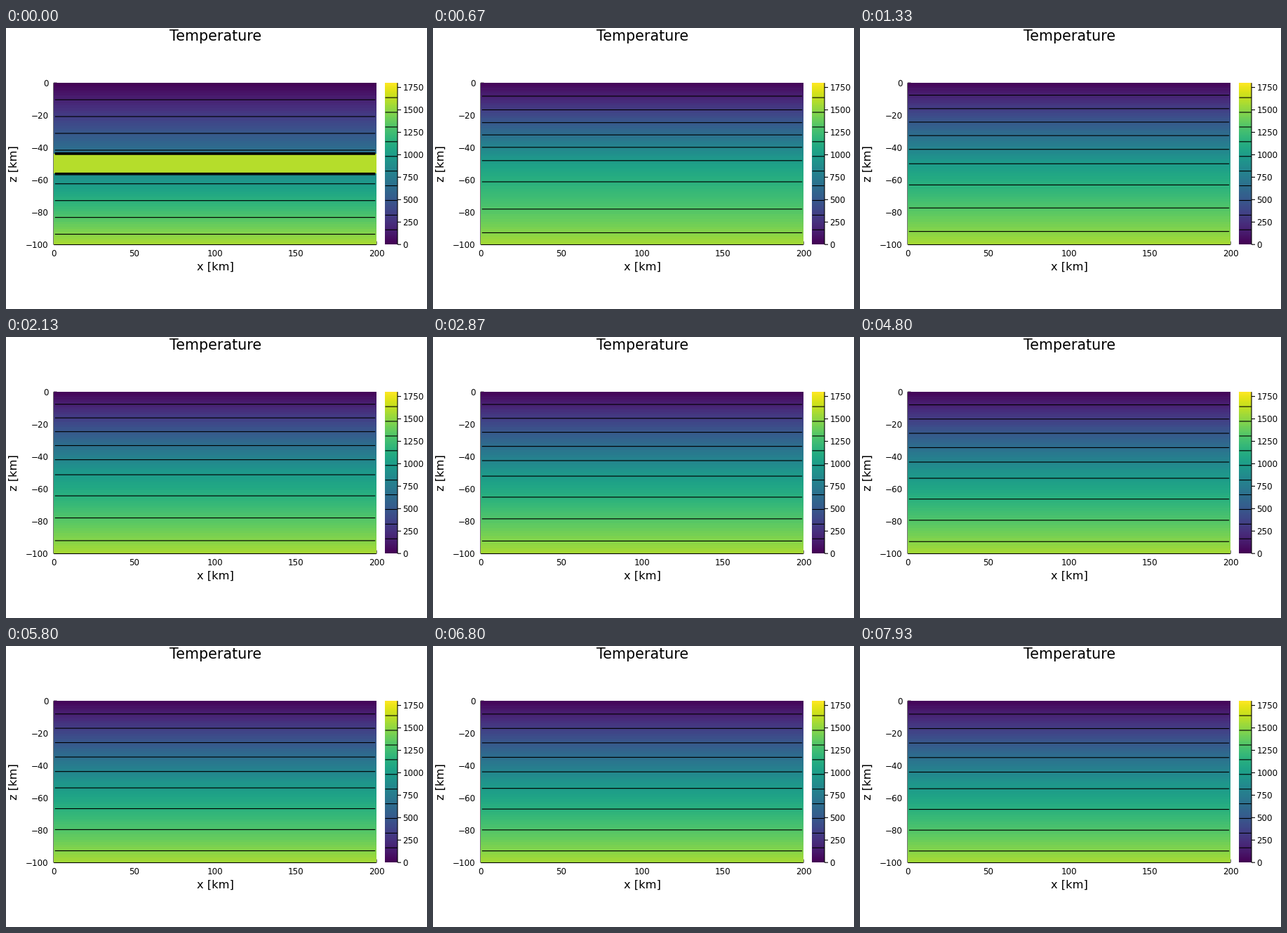
A matplotlib script for the animation above (8 s loop, 600 by 400 pixels).

```python
import numpy as np
import matplotlib.pyplot as plt
from matplotlib.animation import FuncAnimation
from matplotlib.collections import LineCollection

W, H, DPI = 600, 400, 100
FRAMES, LOOP_MS = 120, 8000
LEFT, RIGHT, TOP, BOTTOM = 68, 528, 78.2, 308.2
BAR_L, BAR_R = 540, 558
T_MAX, T_BASE, T_SILL = 1800, 1573, 1600
LEVELS = T_MAX / 11 * np.arange(1, 11)

# 1D heat equation on cell centres, fixed temperatures one cell outside
N = 64
DEPTH = (np.arange(N) + 0.5) * 100 / N
DECAY = 0.0222      # slowest mode, per frame
HEATING = 2.62      # gradient kept up by the heat source at 50 km

start = T_BASE * DEPTH / 100
start[np.abs(DEPTH - 50) < 6.25] = T_SILL

node = np.arange(1, N + 1)
steady = T_BASE * node / (N + 1)
steady += HEATING * (50 + 50 / N - np.abs(DEPTH - 50))

modes = np.sqrt(2 / (N + 1)) * np.sin(np.pi * np.outer(node, node) / (N + 1))
half = np.pi / (2 * (N + 1))
rates = DECAY * (np.sin(node * half) / np.sin(half)) ** 2
weights = modes @ (start - steady)


def temperature(frame):
    return steady + modes @ (weights * np.exp(-rates * frame))


def to_y(depth):
    return TOP + (BOTTOM - TOP) * depth / 100


def bar_y(value):
    return to_y(100 - 100 * value / T_MAX)


def contour_rows(temp):
    rows = []
    for level in LEVELS:
        d = temp - level
        for i in np.flatnonzero(d[:-1] * d[1:] < 0):
            part = d[i] / (d[i] - d[i + 1])
            rows.append(to_y(DEPTH[i] + part * (DEPTH[i + 1] - DEPTH[i])))
    return rows


def px(size):
    return size * 72 / DPI


def label(x, y, text, size, ha="center", **kw):
    ax.text(x, y, text, fontsize=px(size), ha=ha, va="baseline",
            rotation_mode="anchor", **kw)


def line(xs, ys, width=1.1, zorder=3):
    ax.plot(xs, ys, color="black", lw=px(width), zorder=zorder,
            solid_capstyle="butt", snap=False)


plt.rcParams["font.family"] = "DejaVu Sans"
fig = plt.figure(figsize=(W / DPI, H / DPI), dpi=DPI, facecolor="white")
ax = fig.add_axes([0, 0, 1, 1])
ax.axis("off")

style = dict(cmap="viridis", vmin=0, vmax=T_MAX, aspect="auto",
             interpolation="nearest", zorder=1)
field = ax.imshow(start[:, None], extent=(LEFT, RIGHT, BOTTOM, TOP), **style)
ax.imshow(np.linspace(T_MAX, 0, 256)[:, None],
          extent=(BAR_L, BAR_R, BOTTOM, TOP), **style)
ax.set_xlim(0, W)
ax.set_ylim(H, 0)

contours = LineCollection([], colors="black", linewidths=px(1.15),
                          zorder=2, snap=False)
ax.add_collection(contours)

# axes; the frame and its inward ticks lie half under the field
line([LEFT, RIGHT], [BOTTOM + 0.3, BOTTOM + 0.3])
line([LEFT, LEFT], [TOP, BOTTOM], zorder=0)
line([LEFT, LEFT + 4.5], [TOP, TOP], zorder=0)
line([RIGHT, RIGHT], [BOTTOM - 4.5, BOTTOM], zorder=0)
for x in range(0, 201, 50):
    label(LEFT + (RIGHT - LEFT) * x / 200, 324.6, str(x), 11.9)
for z in range(0, 101, 20):
    text = f"\u2212{z}" if z else "0"
    label(60.5, to_y(z) + 4.6, text, 11.9, ha="right")

# colour bar
line([BAR_R, BAR_R], [TOP, BOTTOM])
for value in LEVELS:
    line([BAR_L + 0.5, BAR_R], [bar_y(value)] * 2)
for value in range(0, 1751, 250):
    line([BAR_R, BAR_R + 5], [bar_y(value)] * 2)
    label(565.2, bar_y(value) + 4.6, str(value), 11.9, ha="left")

label(298.3, 18.3, "Temperature", 20.6)
label(298.5, 344.7, "x [km]", 16.2)
label(15.6, 193.3, "z [km]", 16.2, rotation=90)


def update(frame):
    temp = temperature(frame)
    field.set_data(temp[:, None])
    contours.set_segments(
        [[(LEFT + 1.8, y), (RIGHT - 1.8, y)] for y in contour_rows(temp)])
    return field, contours


anim = FuncAnimation(fig, update, frames=FRAMES, interval=LOOP_MS / FRAMES,
                     repeat=True, repeat_delay=0, blit=False)
plt.show()
```
